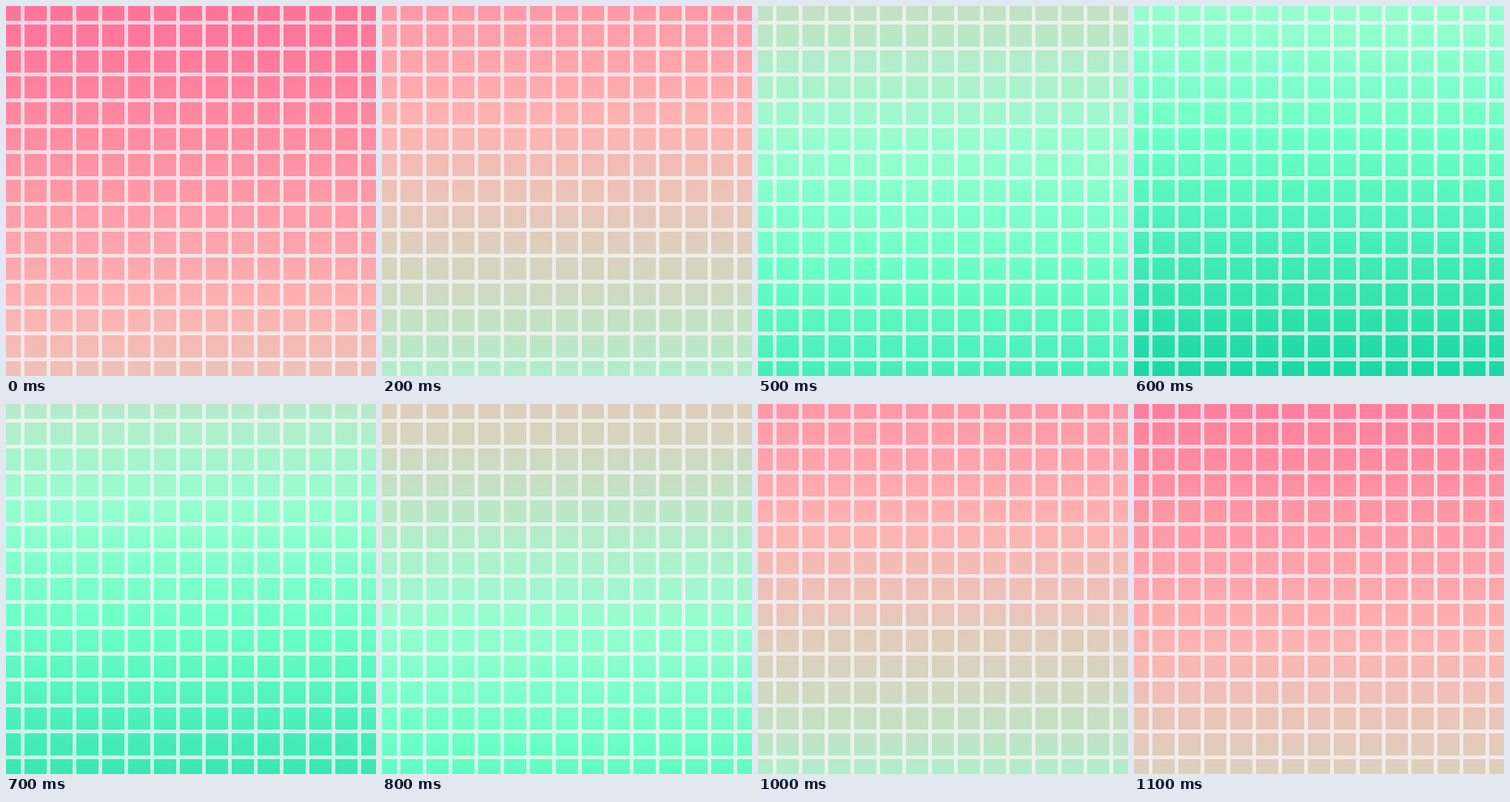
Recreate the animation shown at these times as an HTML page with a canvas. Size 500x500 px, loop 1.3 s.

```html
<!DOCTYPE html>
<html lang="en">
<head>
<meta charset="utf-8">
<title>Gradient grid</title>
<style>
html, body { margin: 0; width: 100%; height: 100%; overflow: hidden; }
canvas { display: block; width: 100vw; height: 100vh; }
</style>
</head>
<body>
<canvas width="500" height="500"></canvas>
<script>
const SIZE = 500, CELL = 35, GAP = 20, LINE = 5;
const LOOP = 1300, STEP = 100;

// Colour ramp: position down the tall gradient, in pixels
const HEIGHT = 1345;
const ramp = [
  [0, "#ff7599"], [55, "#ff789b"], [400, "#ffb1b1"], [570, "#dfcebd"],
  [750, "#b1eecb"], [855, "#96fdcf"], [890, "#8effcd"], [1020, "#6cffc8"],
  [HEIGHT, "#1ad7a5"]
];

// Scroll of the ramp at each step: down, then back up
const scroll = [0, 125, 250, 375, 500, 670, 845, 720, 563, 397, 242, 88];

const ctx = document.querySelector("canvas").getContext("2d");
const grid = new Path2D();
for (let p = GAP; p < SIZE; p += CELL) {
  grid.rect(p, 0, LINE, SIZE);
  grid.rect(0, p, SIZE, LINE);
}

function draw(time) {
  const step = Math.min(Math.floor(time % LOOP / STEP), scroll.length - 1);
  const top = -scroll[step];
  const fill = ctx.createLinearGradient(0, top, 0, top + HEIGHT);
  for (const [y, color] of ramp) fill.addColorStop(y / HEIGHT, color);
  ctx.fillStyle = fill;
  ctx.fillRect(0, 0, SIZE, SIZE);
  ctx.fillStyle = "rgba(249, 249, 250, 0.73)";
  ctx.fill(grid);
}

const start = performance.now();
function tick() {
  draw(performance.now() - start);
  requestAnimationFrame(tick);
}
tick();
</script>
</body>
</html>
```
